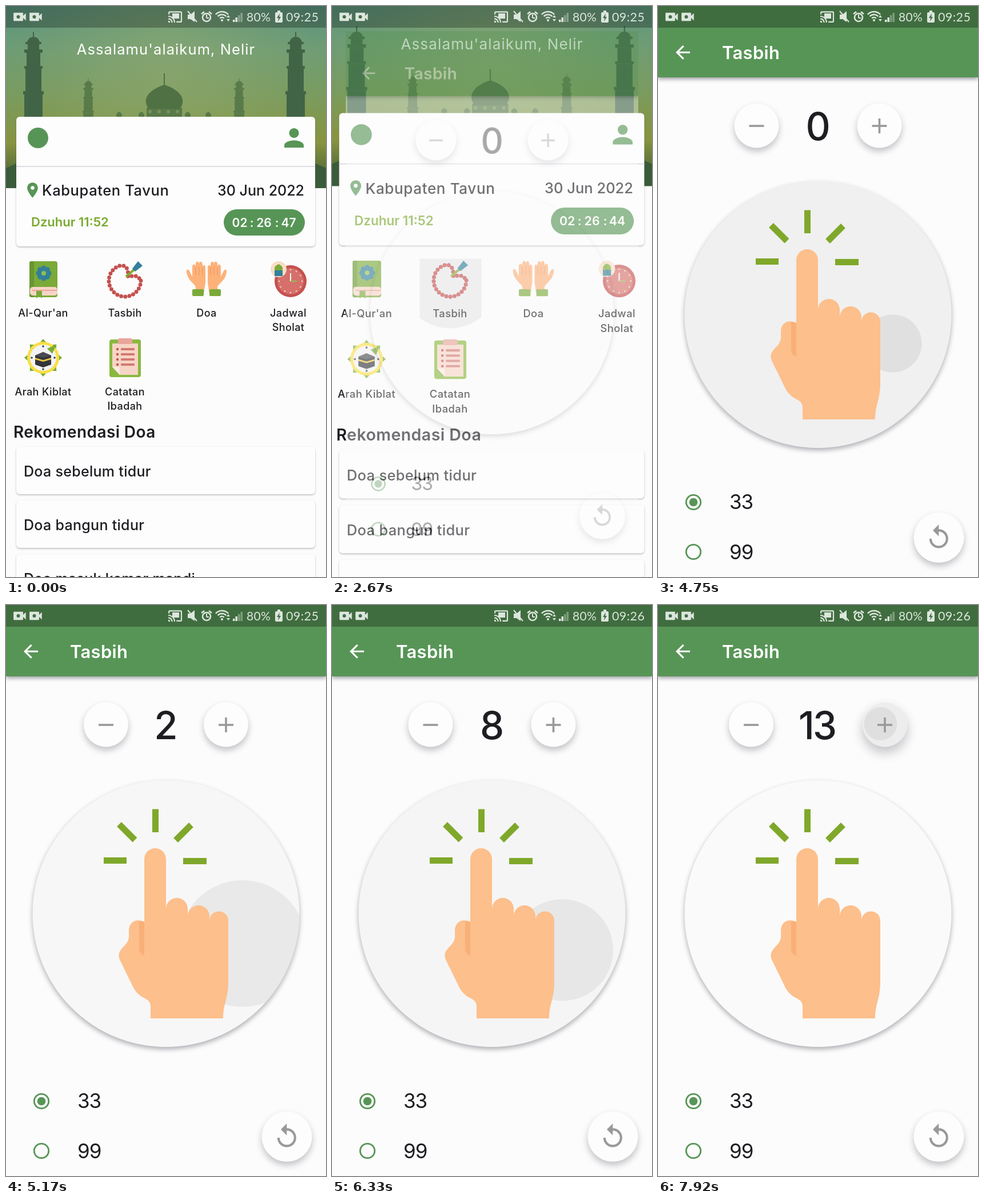
These frames come from a looping animation (560x1000 px, 8000 ms). An HTML page with a canvas:

```html
<!DOCTYPE html>
<html lang="id">
<head>
<meta charset="utf-8">
<title>Tasbih</title>
<style>
  html, body { margin: 0; width: 100%; height: 100%; overflow: hidden; background: #fcfcfc; }
  canvas { display: block; width: 560px; height: 1000px; }
</style>
</head>
<body>
<canvas id="stage" width="560" height="1000"></canvas>
<script>
const W = 560, H = 1000, LOOP = 8000, STEP = 250 / 3, TAU = Math.PI * 2;
const GREEN = '#579556', LIME = '#7fa82b', INK = '#1d1d22', PAPER = '#fcfcfc';
const GREY = '#999', SKIN = '#fdbf8b', RED = '#c4514f', PINK = '#f7d5c6', TEAL = '#337f99';
const HAND_LOADED = 2700;
const screen = document.getElementById('stage').getContext('2d');
const layer = Object.assign(document.createElement('canvas'), { width: W, height: H });
let g = screen;

const clamp = v => Math.max(0, Math.min(1, v));

// Material icons on a 24 unit grid
const icons = {
  back: 'M20 11H7.83l5.59-5.59L12 4l-8 8 8 8 1.41-1.41L7.83 13H20v-2z',
  person: 'M12 12c2.21 0 4-1.79 4-4s-1.79-4-4-4-4 1.79-4 4 1.79 4 4 4zm0 2c-2.67 0-8 1.34-8 4v2h16v-2c0-2.66-5.33-4-8-4z',
  pin: 'M12 2C8.13 2 5 5.13 5 9c0 5.25 7 13 7 13s7-7.75 7-13c0-3.87-3.13-7-7-7zm0 9.5a2.5 2.5 0 0 1 0-5 2.5 2.5 0 0 1 0 5z',
  replay: 'M12 5V1L7 6l5 5V7c3.31 0 6 2.69 6 6s-2.69 6-6 6-6-2.69-6-6H4c0 4.42 3.58 8 8 8s8-3.58 8-8-3.58-8-8-8z',
  video: 'M17 10.5V7c0-.55-.45-1-1-1H4c-.55 0-1 .45-1 1v10c0 .55.45 1 1 1h12c.55 0 1-.45 1-1v-3.5l4 4v-11l-4 4z',
  cast: 'M21 3H3c-1.1 0-2 .9-2 2v3h2V5h18v14h-7v2h7c1.1 0 2-.9 2-2V5c0-1.1-.9-2-2-2zM1 18v3h3c0-1.66-1.34-3-3-3zm0-4v2c2.76 0 5 2.24 5 5h2c0-3.87-3.13-7-7-7zm0-4v2c4.97 0 9 4.03 9 9h2c0-6.08-4.93-11-11-11z'
};
for (const k in icons) icons[k] = new Path2D(icons[k]);

const hand = new Path2D('M242 445A19 19 0 0 1 280 445V532A19 19 0 0 1 318 532V545A19 19 0 0 1 356 545V553' +
  'A16.5 16.5 0 0 1 389 553V660C389 690 380 698 380 724H253V705C254 691 243 690 236 685C226 678 223 670 219 662' +
  'L199 621C195 611 199 605 207 597C217 587 215 580 215 571C215 552 231 549 242 555Z');
const thumb = new Path2D('M233 554Q238 553 242 555V614Q233 611 233 602Z');
const palm = new Path2D('M-13 49V41C-13 35-27 30-29 14C-30 8-25 8-23 14L-19 22V5C-19-1-13-1-13 5V0C-13-6-7-6-7 0' +
  'V-1C-6-6-1-5-1 1V5C0 0 4 1 4 6V30C4 37 2 40 2 49Z');

function icon(name, x, y, s, color) {
  g.save();
  g.translate(x, y);
  g.scale(s, s);
  g.fillStyle = color;
  g.fill(icons[name]);
  g.restore();
}

function text(s, x, y, size, weight, color, align = 'left', gap = 0, family = 'Inter') {
  g.font = `${weight} ${size}px ${family}, sans-serif`;
  g.textAlign = align;
  g.letterSpacing = gap + 'px';
  g.fillStyle = color;
  g.fillText(s, x, y + size * .36);
}

function rect(x, y, w, h, color, r = 0) {
  g.fillStyle = color;
  g.beginPath();
  g.roundRect(x, y, w, h, r);
  g.fill();
}

function disc(x, y, r, color) {
  g.fillStyle = color;
  g.beginPath();
  g.arc(x, y, r, 0, TAU);
  g.fill();
}

function ring(x, y, r, w, color, from = 0, to = TAU) {
  g.strokeStyle = color;
  g.lineWidth = w;
  g.beginPath();
  g.arc(x, y, r, from, to);
  g.stroke();
}

function line(x1, y1, x2, y2, w, color) {
  g.strokeStyle = color;
  g.lineWidth = w;
  g.beginPath();
  g.moveTo(x1, y1);
  g.lineTo(x2, y2);
  g.stroke();
}

function poly(color, ...p) {
  g.fillStyle = color;
  g.beginPath();
  for (let i = 0; i < p.length; i += 2) g.lineTo(p[i], p[i + 1]);
  g.fill();
}

function shaded(dy, blur, alpha, draw) {
  g.save();
  g.shadowColor = `rgba(55,54,70,${alpha})`;
  g.shadowOffsetY = dy;
  g.shadowBlur = blur;
  draw();
  g.restore();
}

function card(x, y, w, h) {
  shaded(1.5, 3, .34, () => rect(x, y, w, h, '#fdfdfd', 6));
}

// ---- home page ----

function minaret(x, top, s, color) {
  const bar = (half, y, h) => rect(x - half * s, top + y * s, half * 2 * s, h * s, color, s);
  bar(1, -3, 12);
  g.fillStyle = color;
  g.beginPath();
  g.ellipse(x, top + 17 * s, 11 * s, 11 * s, 0, Math.PI, TAU);
  g.fill();
  bar(14, 15, 4);
  bar(10, 17, 14);
  bar(16, 28, 6);
  bar(12, 34, 24);
  bar(16, 57, 5);
  bar(14, 62, 42);
  bar(18, 101, 6);
  bar(16, 107, 46);
}

function dome(x, y, rx, ry, color) {
  g.fillStyle = color;
  g.beginPath();
  g.moveTo(x - rx * .85, y);
  g.bezierCurveTo(x - rx * 1.35, y - ry * .55, x - rx * .55, y - ry * .95, x, y - ry * 1.08);
  g.bezierCurveTo(x + rx * .55, y - ry * .95, x + rx * 1.35, y - ry * .55, x + rx * .85, y);
  g.fill();
}

function skyline() {
  const sky = g.createLinearGradient(0, 0, 0, 319);
  [[0, '#5b957f'], [.25, '#6f9c74'], [.5, '#7a9b5e'], [.75, '#88943f'], [.88, '#5f753a'], [1, '#3d5e3b']]
    .forEach(([at, c]) => sky.addColorStop(at, c));
  rect(0, 0, W, 319, sky);
  const glow = g.createRadialGradient(280, 100, 20, 280, 100, 270);
  glow.addColorStop(0, 'rgba(150,172,112,.5)');
  glow.addColorStop(1, 'rgba(150,172,112,0)');
  rect(0, 0, W, 319, glow);
  const far = '#597a49', near = '#416447';
  for (const x of [144, 408]) minaret(x, 128, .55, far);
  for (const x of [198, 354, 237, 318]) dome(x, 194, x % 3 ? 8 : 5, x % 3 ? 15 : 8, far);
  rect(246, 178, 62, 16, far);
  dome(277, 180, 32, 39, '#4f7144');
  rect(276, 118, 2, 22, '#4f7144');
  for (const x of [252, 268, 284, 300]) disc(x, 185, 3, '#789158');
  for (const x of [48, 507]) minaret(x, 48, 1, near);
  poly('#3b5c3a', 0, 284, 20, 275, 20, 319, 0, 319);
  poly('#3b5c3a', W, 284, 540, 275, 540, 319, W, 319);
}

function bookIcon() {
  rect(41, 447, 49, 63, '#7aaa38', 4);
  rect(41, 447, 8, 63, '#67962f', 3);
  for (let i = 0; i < 8; i++) disc(66 + 9 * Math.cos(i * TAU / 8), 468 + 9 * Math.sin(i * TAU / 8), 4.5, TEAL);
  disc(66, 468, 9, TEAL);
  disc(66, 468, 4, '#8fc04c');
  rect(42, 492, 48, 15, PINK, 5);
  rect(46, 497, 44, 2, '#e9a59b');
  poly('#7aaa38', 53, 499, 63, 499, 63, 512, 58, 508, 53, 512);
}

function beadsIcon() {
  g.save();
  g.lineCap = 'round';
  g.lineWidth = 7;
  g.strokeStyle = RED;
  g.setLineDash([0, 7.2]);
  g.beginPath();
  for (let a = 0; a < TAU; a += .05) {
    const r = 28 - 19 * Math.exp(-Math.pow((a - 5.4) / .5, 2));
    g.lineTo(208 + r * Math.cos(a), 481 + r * Math.sin(a));
  }
  g.closePath();
  g.stroke();
  g.restore();
  line(210, 474, 225, 461, 4, LIME);
  poly(TEAL, 221, 460, 231, 447, 239, 455, 226, 465);
}

function palmsIcon() {
  for (const side of [1, -1]) {
    g.save();
    g.translate(351 + side * 5, 452);
    g.scale(-side, 1);
    g.fillStyle = '#fdb27a';
    g.translate(-1, 0);
    g.fill(palm);
    for (const x of [-13, -7, -1]) line(x, 5, x, 19, 1, '#ec925f');
    g.restore();
    rect(351 + side * 15 - 10, 496, 20, 12, '#7aaa38', 2);
  }
}

function clockIcon() {
  disc(498, 482, 28, RED);
  disc(498, 482, 23, '#d6706b');
  for (let i = 0; i < 12; i++) disc(498 + 20 * Math.cos(i * TAU / 12), 482 + 20 * Math.sin(i * TAU / 12), 1.3, PINK);
  line(498, 468, 498, 482, 2, '#fff');
  line(498, 482, 509, 482, 2, '#8fc04c');
  disc(477, 461, 14, '#f8ddc6');
  rect(470, 462, 14, 11, TEAL);
  dome(477, 463, 7, 10, '#7aaa38');
}

function compassIcon() {
  for (let i = 0; i < 8; i++) {
    g.save();
    g.translate(65, 616);
    g.rotate(i * TAU / 8);
    poly('#7aaa38', -6, -26, 0, -33, 6, -26);
    g.restore();
  }
  disc(65, 616, 28, '#f8df45');
  disc(65, 616, 23, '#f3f3f5');
  poly('#7aaa38', 72, 600, 88, 593, 81, 609);
  for (let i = 0; i < 4; i++) disc(65 + 20 * Math.cos(i * TAU / 4), 616 + 20 * Math.sin(i * TAU / 4), 1.8, '#444');
  poly('#33343a', 51, 612, 65, 606, 79, 612, 79, 628, 65, 633, 51, 628);
  poly('#4b4c53', 51, 612, 65, 606, 79, 612, 65, 616);
  poly('#e9c541', 51, 616, 65, 620, 79, 616, 79, 619, 65, 623, 51, 619);
}

function notesIcon() {
  rect(181, 584, 55, 66, '#8ab83f', 4);
  poly(PINK, 186, 591, 231, 591, 231, 646, 199, 646, 186, 632);
  poly('#fdebe2', 186, 632, 199, 632, 199, 646);
  rect(196, 582, 25, 10, '#e9a59b', 3);
  for (let i = 0; i < 4; i++) {
    disc(195, 601 + i * 9, 2.2, RED);
    rect(201, 599 + i * 9, 24, 4, '#d37973', 1);
  }
}

function drawHome(t) {
  rect(0, 0, W, H, PAPER);
  skyline();
  text("Assalamu'alaikum, Nelir", 280, 76, 25.5, 400, '#fff', 'center', 1.1);
  card(18, 194, 523, 227);
  rect(18, 280, 523, 2, '#dddde4');
  disc(56, 231, 18, GREEN);
  icon('person', 478.6, 205.5, 2.12, GREEN);
  icon('pin', 30.5, 306.5, 1.33, GREEN);
  text('Kabupaten Tavun', 63, 323, 25.5, 500, INK, 'left', .6);
  text('30 Jun 2022', 522, 323, 25, 500, INK, 'right');
  text('Dzuhur 11:52', 44, 378, 22, 600, '#7aa92e');
  rect(381, 356, 142, 46, GREEN, 23);
  const left = 47 - Math.floor((t + 835) / 1000);
  [['02', 409], [':', 430], ['26', 451.5], [':', 474], [String(Math.max(44, left)), 494.5]]
    .forEach(([s, x]) => text(s, x, 379, 21, 600, '#fff', 'center'));

  const ink = t - 2612;
  if (ink > 0) {
    g.save();
    g.beginPath();
    g.rect(156, 444, 106, 127);
    g.clip();
    disc(208, 478, 1.556 * ink, `rgba(200,200,204,${.4 * clamp(1.2 - ink / 200)})`);
    g.restore();
  }
  bookIcon();
  beadsIcon();
  palmsIcon();
  clockIcon();
  compassIcon();
  notesIcon();
  [["Al-Qur'an", 65, 538], ['Tasbih', 208, 538], ['Doa', 351, 538], ['Jadwal', 494, 538], ['Sholat', 494, 563],
    ['Arah Kiblat', 65, 676], ['Catatan', 208, 676], ['Ibadah', 208, 701]]
    .forEach(([s, x, y]) => text(s, x, y, 18, 500, INK, 'center', .4));
  text('Rekomendasi Doa', 13, 746, 28, 600, INK, 'left', .4);
  ['Doa sebelum tidur', 'Doa bangun tidur', 'Doa masuk kamar mandi'].forEach((s, i) => {
    card(18, 772 + i * 94, 523, 83);
    text(s, 31, 815 + i * 94, 25, 500, INK, 'left', .3);
  });
}

// ---- counter page ----

const digitWidth = [45, 24, 40, 40, 44, 41, 44, 37, 45, 44];
const tapX = [411, 414, 412, 409, 411, 408, 405, 403, 407, 412, 414, 413];
const taps = tapX.map((x, i) => {
  const up = i ? 5119 + 196.8 * (i - 1) : 4870;
  return { x, y: 591 + 1.9 * i, up, down: i ? up - 80 : 4640 };
});
const plusTap = { down: 7710, up: 7905 };

// Grows slowly while held, quickly once released
function splash(t, tap, x, y, slow) {
  if (t < tap.down || t > tap.up + 200) return;
  const r = slow * (Math.min(t, tap.up) - tap.down) + 1.556 * Math.max(0, t - tap.up);
  disc(x, y, r, `rgba(200,200,200,${.4 * clamp(1 - (t - tap.up) / 200)})`);
}

function roundButton(x, y, r, press = 0) {
  shaded(6 + 4 * press, 12 + 7 * press, .3, () => disc(x, y, r, '#fdfdfd'));
}

function drawCount(t) {
  const count = taps.filter(p => t >= p.up).length + (t >= plusTap.up);
  const digits = [...String(count)].map(Number);
  const width = digits.reduce((sum, d) => sum + digitWidth[d], 0);
  const off = 85 + width / 2, press = clamp((t - plusTap.down) / 200);
  let x = 280 - width / 2;
  for (const d of digits) {
    text(d, x + digitWidth[d] / 2, 211, 67, 500, INK, 'center');
    x += digitWidth[d];
  }
  const minus = 280 - off, plus = 280 + off;
  roundButton(minus, 209.5, 39);
  roundButton(plus, 209.5, 39, press);
  g.save();
  g.beginPath();
  g.arc(plus, 209.5, 39, 0, TAU);
  g.clip();
  if (press) disc(plus, 209.5, 39, `rgba(188,188,188,${.25 * press})`);
  splash(t, plusTap, plus - 7.5, 208, .055);
  g.restore();
  line(minus - 13, 210, minus + 13, 210, 3.6, GREY);
  line(plus - 13, 210, plus + 13, 210, 3.6, GREY);
  line(plus, 197, plus, 223, 3.6, GREY);
}

function drawPad(t) {
  shaded(4, 9, .4, () => disc(280, 540.5, 233.5, '#fafafa'));
  g.save();
  g.beginPath();
  g.arc(280, 540.5, 233.5, 0, TAU);
  g.clip();
  for (const p of taps) {
    const held = clamp((Math.min(t, p.up) - p.down) / 200) - Math.max(0, t - p.up) / 200;
    if (held > 0) rect(40, 300, 480, 480, `rgba(188,188,188,${.3 * held})`);
    splash(t, p, p.x, p.y, .46);
  }
  g.restore();
  if (t < HAND_LOADED) return;
  [[171, 447.5, 211, 447.5], [198, 384, 225.5, 411.5], [261.5, 357.5, 261.5, 398], [324, 385, 297, 412], [310, 448.5, 351, 448.5]]
    .forEach(p => line(...p, 11, LIME));
  g.fillStyle = SKIN;
  g.fill(hand);
  g.fillStyle = '#f9b078';
  g.fill(thumb);
}

function drawCounter(t) {
  rect(0, 0, W, H, PAPER);
  shaded(3, 7, .5, () => rect(0, 0, W, 125, GREEN));
  icon('back', 24.8, 62.5, 1.56, '#fff');
  text('Tasbih', 112, 82, 31, 600, '#fff', 'left', .3);
  drawCount(t);
  drawPad(t);
  ring(62, 869, 12.7, 2.8, GREEN);
  disc(62, 869, 7.3, GREEN);
  ring(62, 956, 12.7, 2.8, GREEN);
  text('33', 125, 868, 35, 400, INK, 'left', -1);
  text('99', 125, 956, 35, 400, INK, 'left', -1);
  roundButton(491.5, 931, 44);
  icon('replay', 466.5, 906, 2.07, GREY);
}

// ---- system bar ----

function drawStatus(t) {
  const c = '#dce6dd', dim = 'rgba(220,230,221,.4)', dark = '#416f48';
  rect(0, 0, W, 38, 'rgba(0,0,0,.27)');
  for (const x of [9.5, 37.5]) {
    icon('video', x, 4.6, 1.2, c);
    disc(x + 12, 19, 3, dark);
  }
  icon('cast', 283, 6, 1.09, c);
  rect(291, 13, 12, 9, c);
  poly(c, 318, 15, 323, 15, 330, 9, 330, 28, 323, 23, 318, 23);
  line(318, 9, 334, 28, 2, c);
  ring(351, 20, 7, 2.6, c);
  line(351, 15, 351, 21, 2, c);
  line(351, 21, 355, 21, 2, c);
  line(342, 14, 347, 10, 2.6, c);
  line(355, 10, 360, 14, 2.6, c);
  for (const r of [5, 10, 15]) ring(378, 25, r, 2.4, c, -2.4, -.74);
  disc(378, 25, 2, c);
  poly(c, 386, 20, 389, 16, 392, 20);
  poly(c, 386, 23, 389, 27, 392, 23);
  for (let i = 0; i < 4; i++) rect(397 + i * 4.5, 24 - i * 4, 3.5, 4 + i * 4, i < 2 ? c : dim);
  text('80%', 421, 19.5, 21, 400, c, 'left', .3, 'Lato');
  rect(471, 11, 13, 18, c, 2);
  rect(475, 8, 5, 4, c);
  poly(dark, 479, 13, 474, 21, 477, 21, 476, 27, 481, 19, 478, 19);
  text(t < 5900 ? '09:25' : '09:26', 490, 19.5, 21.5, 400, c, 'left', .4, 'Lato');
}

// ---- page change ----

function scaled(s, draw) {
  g.save();
  g.translate(W / 2, H / 2);
  g.scale(s, s);
  g.translate(-W / 2, -H / 2);
  draw();
  g.restore();
}

function render(t) {
  const p = clamp((t - 2615) / 300);
  g = screen;
  if (p === 0) drawHome(t);
  else if (p === 1) drawCounter(t);
  else {
    const zoom = p < .1667 ? p * 2.4 : 1 - .6 * Math.pow((1 - p) / .8333, 5);
    g = layer.getContext('2d');
    drawCounter(t);
    g = screen;
    scaled(1 + .05 * zoom, () => drawHome(t));
    rect(0, 0, W, H, `rgba(0,0,0,${.6 * clamp((p - .2075) / .21)})`);
    g.globalAlpha = clamp((p - .125) / .125);
    scaled(.85 + .15 * zoom, () => g.drawImage(layer, 0, 0));
    g.globalAlpha = 1;
  }
  drawStatus(t);
}

function tick() {
  const t = performance.now() % LOOP;
  render(Math.floor((t + 4) / STEP) * STEP);
  requestAnimationFrame(tick);
}
tick();
</script>
</body>
</html>
```
